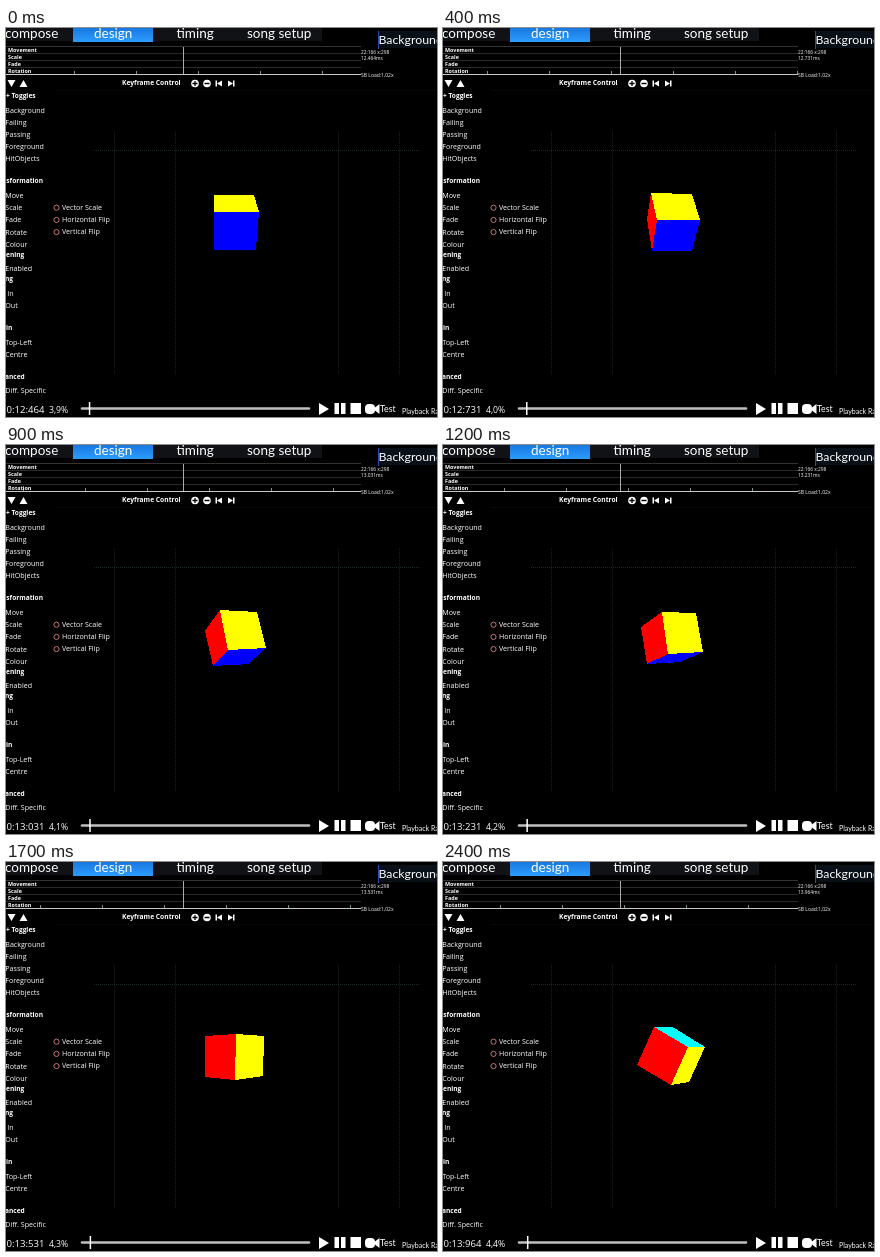
These frames come from a looping animation (431x389 px, 2.5 s). An HTML page:

```html
<!DOCTYPE html>
<html lang="en">
<head>
<meta charset="utf-8">
<title>Storyboard cube</title>
<style>
html, body { margin: 0; width: 100%; height: 100%; overflow: hidden; background: #000; }
svg { display: block; width: 431px; height: 389px; }
text { fill: #fff; font-family: "Open Sans", "Noto Sans", sans-serif; font-size: 7.1px; font-weight: 500; white-space: pre; }
.bold { font-weight: 700; }
.tab { font: 13.5px Lato, sans-serif; }
.crisp { shape-rendering: crispEdges; }
</style>
</head>
<body>
<svg id="stage" viewBox="0 0 431 389">
  <defs>
    <linearGradient id="tabFill" x2="0" y2="1">
      <stop offset="0" stop-color="#1878e0"/><stop offset="1" stop-color="#2c9cff"/>
    </linearGradient>
  </defs>
  <rect width="431" height="389"/>

  <g class="crisp" stroke="#24182a" stroke-dasharray="1 1" fill="none">
    <path d="M108.5 103V346M169.5 103V346M332.5 103V346M393.5 103V346"/>
    <path d="M88 122.5H414" stroke="#1c2a24"/>
    <path d="M48 62.5H431" stroke="#100c14"/>
  </g>

  <rect width="316" height="13" fill="#101216"/>
  <rect x="67" width="80" height="14" fill="url(#tabFill)"/>
  <rect x="372" y="3" width="59" height="17" fill="#0a1018"/>
  <path d="M372.5 3V21" stroke="#2848b8"/>

  <g class="crisp" fill="none">
    <path d="M0 18.5H355" stroke="#333"/>
    <path d="M0 25.5H355M0 32.5H355M0 39.5H355" stroke="#2a2a2a"/>
    <path d="M0 46.5H355" stroke="#c8c8c8"/>
    <path id="ticks" stroke="#7c947c"/>
    <path d="M177.5 19V46" stroke="#aaa"/>
  </g>

  <g fill="#fff">
    <path d="M1.5 52H9.5L5.5 59ZM13.5 59H21.5L17.5 52Z"/>
    <circle cx="189" cy="55.5" r="3.8"/><circle cx="201" cy="55.5" r="3.8"/>
    <path d="M209.5 52.5H211V58.5H209.5ZM216 52.5V58.500L211 55.5ZM227 52.5H228.500V58.5H227ZM222 52.5V58.5L227 55.5Z"/>
    <path d="M186.5 55.5H191.5M189 53V58M198.5 55.5H203.5" stroke="#000" stroke-width="1.3"/>
  </g>

  <g id="radios" fill="none" stroke="#d88080" stroke-width=".9"></g>
  <g id="labels"></g>
  <g id="cube" class="crisp"></g>

  <path d="M76 380.5H303" stroke="#c0c0c0" stroke-width="2.600" stroke-linecap="round"/>
  <rect id="playhead" y="374" width="1.5" height="13" fill="#fff"/>
  <g fill="#fff">
    <path d="M313 375L323 381L313 387ZM328.5 375H333V386H328.5ZM335 375H339.5V386H335ZM344.5 375H355V386H344.5Z"/>
    <rect x="359" y="376" width="10" height="10" rx="4"/>
    <path d="M367 381L373.5 376V386Z"/>
  </g>
</svg>
<script>
const byId = id => document.getElementById(id);

function add(parent, tag, attrs, content = "") {
  const node = document.createElementNS("http://www.w3.org/2000/svg", tag);
  for (const key in attrs) node.setAttribute(key, attrs[key]);
  node.textContent = content;
  return byId(parent).appendChild(node);
}

const label = (x, y, content, kind = "", size = "") =>
  add("labels", "text", { x, y, class: kind, style: size && `font-size:${size}px` }, content);

label(-1, 9.5, "compose", "tab");
label(88, 9.5, "design", "tab");
label(170.5, 9.5, "timing", "tab");
label(241, 9.5, "song setup", "tab");
label(372.5, 15.8, "Background", "tab", 12.3);

["Movement", "Scale", "Fade", "Rotation"].forEach((row, i) =>
  label(2, 24 + 7 * i, row, "bold", 5.4));
label(116, 57, "Keyframe Control", "bold", 6.7);
label(355, 26, "22:166 x:298", "", 4.8);
label(355, 49, "SB Load:1,02x", "", 5);

function section(x, y, title, firstRow, rows) {
  label(x, y, title, "bold", 6.6);
  rows.forEach((row, i) => label(-0.7, firstRow + 12.2 * i, row));
}
section(0, 70, "+ Toggles", 84.5, ["Background", "Failing", "Passing", "Foreground", "HitObjects"]);
section(-4, 155, "nsformation", 170, ["Move", "Scale", "Fade", "Rotate", "Colour"]);
section(0, 228.5, "ening", 243, ["Enabled"]);
section(-1, 253, "ng", 267.5, [" In", "Out"]);
section(0, 301.5, "in", 316.5, ["Top-Left", "Centre"]);
section(-1, 350.5, "anced", 365, ["Diff. Specific"]);

["Vector Scale", "Horizontal Flip", "Vertical Flip"].forEach((row, i) => {
  add("radios", "circle", { cx: 50.5, cy: 179.7 + 12.2 * i, r: 2.6 });
  label(56, 182 + 12.2 * i, row);
});

label(374, 384, "Test", "tab", 8.8);
label(396, 385.5, "Playback Rate", "tab", 7);
const clock = label(0.5, 385, "", "", 9.6);
const percent = label(43, 385, "", "", 8.7);
const stamp = label(355, 32, "", "", 4.8);

// Song time and cube corners, keyed by step number.
const STEP = 100, STEPS = 25;
const keys = [0, 4, 9, 12, 17, 21, 24];
const songTime = [12464, 12731, 13031, 13231, 13531, 13799, 13964];
const corners = {
  frontTopLeft: [[208, 208, 214, 219, 230, 240, 245], [167, 165, 165, 167, 172, 180, 185]],
  frontTopRight: [[248, 249, 251, 253, 258, 260, 262], [167, 166, 167, 168, 174, 181, 185]],
  frontLowRight: [[253, 257, 260, 260, 257, 251, 246], [184, 192, 203, 207, 214, 219, 220]],
  frontLowLeft: [[208, 214, 222, 225, 229, 229, 228], [184, 192, 205, 209, 218, 221, 223]],
  backLowLeft: [[208, 209, 207, 204, 199, 196, 194], [222, 223, 221, 219, 215, 208, 203]],
  backTopLeft: [[208, 204, 199, 198, 199, 206, 211], [204, 191, 186, 182, 174, 168, 165]]
};

function segment(step) {
  let i = 0;
  while (i < keys.length - 2 && step >= keys[i + 1]) i++;
  return i;
}

function linear(values, step) {
  const i = segment(step);
  return values[i] + (values[i + 1] - values[i]) * (step - keys[i]) / (keys[i + 1] - keys[i]);
}

function smooth(values, step) {
  const i = segment(step), span = keys[i + 1] - keys[i], u = (step - keys[i]) / span;
  const slope = k => {
    const a = Math.max(k - 1, 0), b = Math.min(k + 1, keys.length - 1);
    return span * (values[b] - values[a]) / (keys[b] - keys[a]);
  };
  const v = 1 - u;
  return v * v * ((1 + 2 * u) * values[i] + u * slope(i))
    + u * u * ((3 - 2 * u) * values[i + 1] - v * slope(i + 1));
}

const faces = ["#00f", "#0ff", "#f00", "#ff0"].map(fill => add("cube", "polygon", { fill }));

// Only faces turned towards the viewer wind clockwise.
function drawFace(face, points) {
  const area = points.reduce((sum, [x, y], i) => {
    const [nx, ny] = points[(i + 1) % points.length];
    return sum + x * ny - nx * y;
  }, 0);
  face.setAttribute("points", area > 0 ? points.join(" ") : "");
}

function drawCube(step) {
  const p = {};
  for (const name in corners) p[name] = corners[name].map(track => smooth(track, step));
  const { frontTopLeft: a, frontTopRight: b, frontLowRight: c, frontLowLeft: d,
    backLowLeft: e, backTopLeft: f } = p;
  const offset = (base, from, to, scale) => base.map((v, i) => v + (to[i] - from[i]) * scale);
  const backLowRight = offset(e, d, c, 0.93), backTopRight = offset(f, a, b, 1.1);
  [[d, c, backLowRight, e], [f, backTopRight, b, a], [f, a, d, e], [a, b, c, d]]
    .forEach((points, i) => drawFace(faces[i], points));
}

function render(time) {
  const step = Math.floor(time / STEP) % STEPS;
  const ms = Math.round(linear(songTime, step));
  const seconds = Math.floor(ms / 1000), rest = String(ms % 1000).padStart(3, "0");
  drawCube(step);
  clock.textContent = `0:${seconds}:${rest}`;
  stamp.textContent = `${seconds}.${rest}ms`;
  percent.textContent = (4.25 + (ms - 13530) * 0.000294).toFixed(1).replace(".", ",") + "%";
  byId("playhead").setAttribute("x", 82.8 + (ms - 12464) / 1300);

  let ticks = "";
  const shift = (ms - 12464) * 0.09 % 62;
  for (let x = 68 - shift; x < 355; x += 62) ticks += `M${Math.round(x) + 0.5} 43V46`;
  byId("ticks").setAttribute("d", ticks);
}

const start = performance.now();
function tick() {
  render(performance.now() - start);
  requestAnimationFrame(tick);
}
render(0);
requestAnimationFrame(tick);
</script>
</body>
</html>
```
